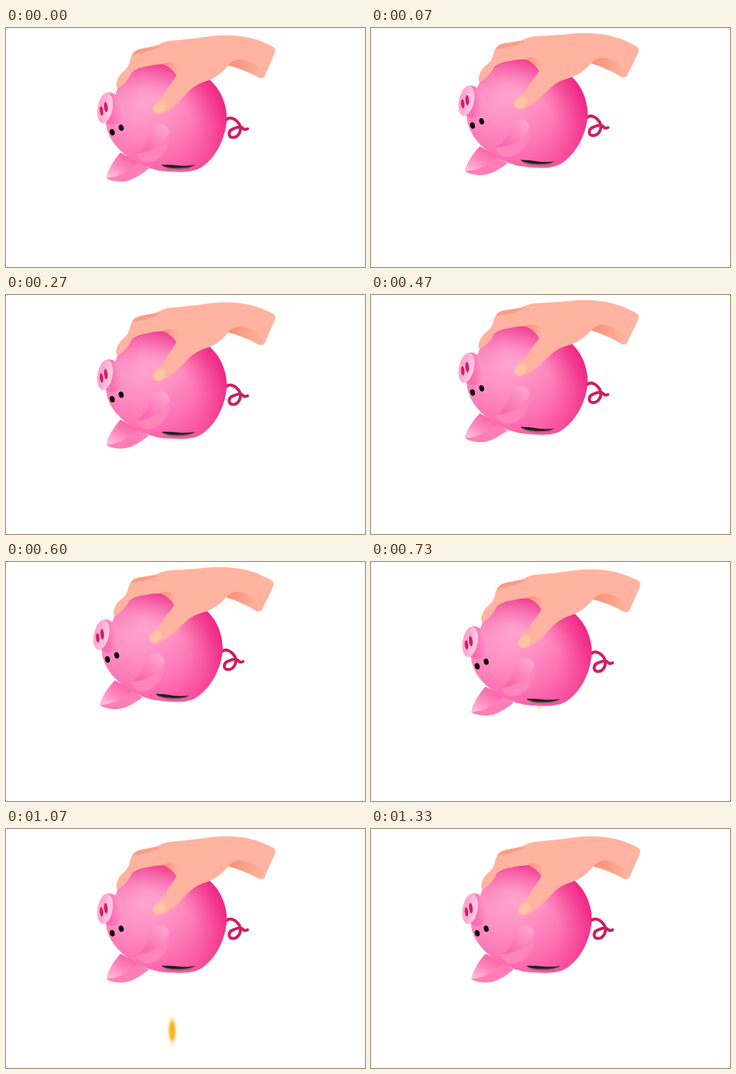
An HTML page for the animation above (2.99 s loop, 480 by 320 pixels).

```html
<!DOCTYPE html>
<html lang="en">
<head>
<meta charset="utf-8">
<title>Piggy bank</title>
<style>
  html, body { margin: 0; width: 100%; height: 100%; overflow: hidden; background: #fff; }
  svg { display: block; width: 100vw; height: 100vh; }
</style>
</head>
<body>
<svg viewBox="0 0 480 320">
  <defs>
    <radialGradient id="skin" gradientUnits="userSpaceOnUse" cx="182" cy="82" r="128">
      <stop offset="0" stop-color="#ffadd4"/>
      <stop offset=".4" stop-color="#ff91c4"/>
      <stop offset=".7" stop-color="#fd74b4"/>
      <stop offset="1" stop-color="#fb559f"/>
    </radialGradient>
    <radialGradient id="rim" gradientUnits="userSpaceOnUse" cx="208" cy="134" r="92">
      <stop offset=".45" stop-color="#ee2383" stop-opacity="0"/>
      <stop offset="1" stop-color="#ec1f7f" stop-opacity=".9"/>
    </radialGradient>
    <linearGradient id="rimFade" x1=".35" y1="1" x2=".95" y2=".35">
      <stop offset=".25" stop-color="#000"/>
      <stop offset=".9" stop-color="#fff"/>
    </linearGradient>
    <mask id="rimMask"><rect x="130" y="40" width="170" height="156" fill="url(#rimFade)"/></mask>
    <linearGradient id="fold" x1=".2" y1=".8" x2=".8" y2=".1">
      <stop offset="0" stop-color="#fb68ad"/>
      <stop offset="1" stop-color="#ffa2ce"/>
    </linearGradient>
    <linearGradient id="sole" x1="0" y1="1" x2=".8" y2="0">
      <stop offset=".1" stop-color="#ffbbda"/>
      <stop offset=".45" stop-color="#ff8ac0"/>
      <stop offset="1" stop-color="#f9559f"/>
    </linearGradient>
    <linearGradient id="snout">
      <stop offset=".45" stop-color="#fa6bae"/>
      <stop offset="1" stop-color="#ff9ccb"/>
    </linearGradient>
    <linearGradient id="face">
      <stop offset=".3" stop-color="#ffa6d1"/>
      <stop offset="1" stop-color="#ffcfe5"/>
    </linearGradient>
    <linearGradient id="wrist" x1="0" y1="0" x2="1" y2=".2">
      <stop offset="0" stop-color="#f78d71"/>
      <stop offset="1" stop-color="#ffb29e"/>
    </linearGradient>
    <filter id="soft" x="-50%" y="-50%" width="200%" height="200%"><feGaussianBlur stdDeviation="1.6"/></filter>
    <path id="body" d="M151 76C165 58 190 46 220 46C248 48 270 64 282 80C292 94 296 112 295 124C293 148 281 173 262 186C248 195 226 193 205 191Q180 186 160 170C144 158 132 139 134 122Z"/>
  </defs>

  <g id="coin" filter="url(#soft)">
    <g id="disc">
      <path fill="#f8e08a" d="M-15-2A15 16 0 0 1 15-2Q15 9 7 14L0 21L-7 14Q-15 9-15-2Z"/>
      <ellipse fill="#f9b21f" rx="12.500" ry="13"/>
    </g>
  </g>

  <g id="pig">
    <path fill="none" stroke="#cb1f65" stroke-width="4" stroke-linecap="round" stroke-linejoin="round"
      d="M294 123C299 118 307 121 312 129C316 137 311 146 304 146.500C296 147 297 137 304 135C310 132 315 132 317 134.500Q319 137 323 135"/>
    <path fill="#ff7db7" d="M153 167C144 177 135 192 134.500 201Q138 204 150 205.500C166 207 178 198 191 188Z"/>
    <path fill="url(#sole)" d="M134.500 201C135 192 144 177 153 167L178 180C166 187 160 198 134.500 201Z"/>
    <path fill="#e3337f" d="M157 68Q167 52 190 47L187 58Z"/>
    <use href="#body" fill="url(#skin)"/>
    <use href="#body" fill="url(#rim)" mask="url(#rimMask)"/>
    <path fill="#ff84bb" d="M174 168C189 161 190 143 199 131Q205 126 213 130Q220 137 219 148C217 165 204 180 189 180Q178 179 174 168Z"/>
    <path fill="url(#fold)" d="M174 168C189 161 190 143 199 131Q205 126 213 130Q217 133 218.500 140C209 160 187 168 174 168Z"/>

    <ellipse cx="140" cy="108" rx="16" ry="22" fill="url(#snout)" transform="rotate(-10 140 108)"/>
    <ellipse cx="132.500" cy="107" rx="10" ry="20.500" fill="url(#face)" transform="rotate(10 132.5 107)"/>
    <g fill="#cc2168">
      <ellipse cx="127.700" cy="111" rx="2.300" ry="6.300" transform="rotate(-6 127.7 111)"/>
      <ellipse cx="133.500" cy="106" rx="2.400" ry="7" transform="rotate(-6 133.5 106)"/>
    </g>
    <g fill="#080305">
      <ellipse cx="142" cy="139.500" rx="3.200" ry="4.300" transform="rotate(-18 142 139.500)"/>
      <ellipse cx="154" cy="133.500" rx="3.200" ry="4.300" transform="rotate(-18 154 133.500)"/>
    </g>
    <path fill="#86686c" d="M208 184Q230 186 253 184Q247 189.500 230 189.500Q213 189.500 208 184Z"/>
    <path fill="#2a1b20" d="M207.500 183Q219 182.500 230 184T253.500 183Q245 187.500 230 187.500Q214 187.500 207.500 183Z"/>

    <path fill="#ec6c63" d="M166 44Q168 34 174 30Q190 26 208 22L212 38Z"/>
    <path fill="#ffb3a0" d="M360 29Q360 33 356 41L346 64Q344 68 338 66.500Q328 60 318 57Q306 52 297 50Q286 64 271 70Q254 75 245 84Q234 96 225 104Q214 113 207 115Q197 116 196 108Q197 101 207 94Q213 88 216 80Q224 71 228 63Q222 53 211 48.500Q200 48 190 51Q176 53 168 60Q161 74 151 80Q147 82 147.500 75Q149 66 155 60Q162 55 165 47Q167 38 170 33Q174 29 181 27.500Q196 25 203 23Q211 18 220 17Q245 15 266 12Q285 9 302 10Q327 11 346 20Q360 25 360 29Z"/>
    <path fill="url(#wrist)" d="M297 50Q307 39 319 43Q336 48 347 62Q345 68.500 338 66.500Q318 55 297 50Z"/>
    <path fill="url(#wrist)" d="M209 48Q219 43 228 49Q235 57 228 63Q222 53 209 48Z"/>
    <path fill="#f99078" opacity=".65" d="M169 36Q174 29 181 28L208 24Q195 31 169 36Z"/>
    <path fill="#ffc3a6" d="M197 107Q199 101 207 98Q215 99 213 107Q209 113 203 115Q197 114 197 107Z"/>
  </g>
</svg>
<script>
  const LOOP = 2990;
  const [pig, coin, disc] = ['pig', 'coin', 'disc'].map(id => document.getElementById(id));

  // Fifteen poses a second, with step times rounded to 10 ms.
  const stepAt = t => Math.floor(t / 200) * 3 + (t % 200 >= 70) + (t % 200 >= 130);

  // One shake: there and back over four steps.
  const shake = step => Math.max(0, 2 - Math.abs(step - 2));

  function draw(now) {
    const step = stepAt(now % LOOP);
    const swing = shake(step) + shake(step - 6);
    pig.setAttribute('transform', `rotate(${2.3 * swing} 363 -20)`);

    const fall = step - 13;
    const spin = Math.max(0.34, Math.abs(Math.cos(fall * Math.PI / 6)));
    coin.setAttribute('visibility', step >= 11 && step < 20 ? 'visible' : 'hidden');
    coin.setAttribute('transform', `translate(${224 - fall * 0.6} ${214.5 + fall * 18.6})`);
    disc.setAttribute('transform', `scale(${spin} 1)`);
    requestAnimationFrame(draw);
  }
  draw(0);
</script>
</body>
</html>
```
